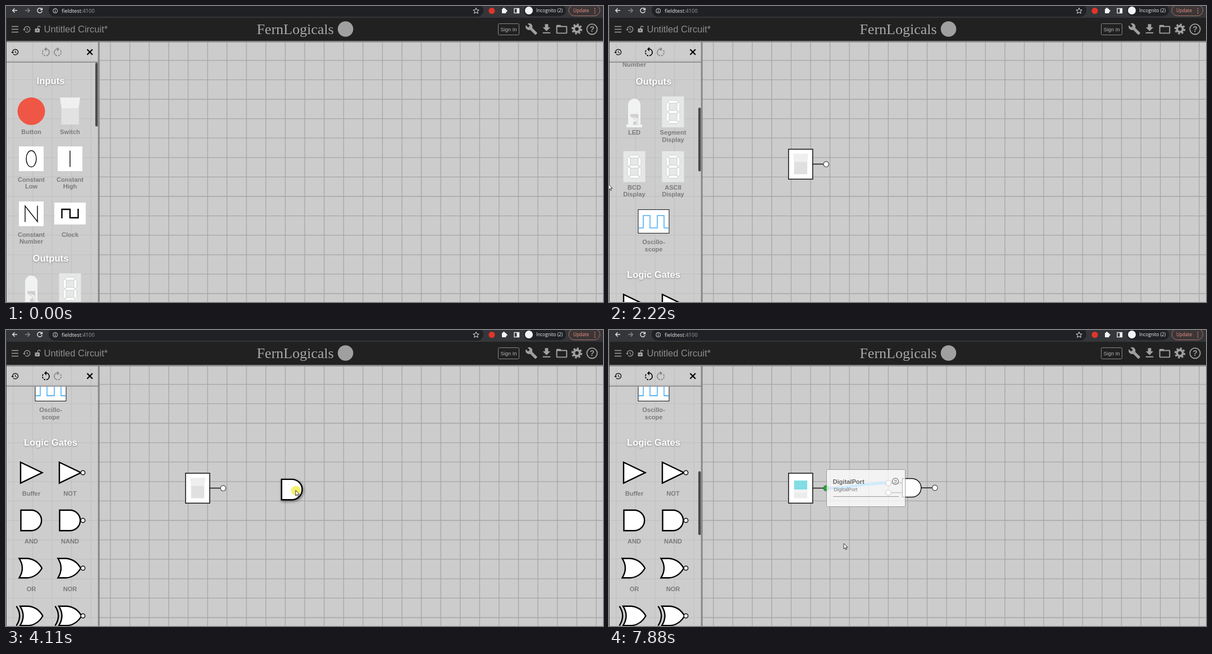
An HTML page that plays this animation: 1063x527 px, repeating every 8000 ms.

```html
<!DOCTYPE html>
<html lang="en">
<head>
<meta charset="utf-8">
<title>Circuit editor</title>
<style>
  html, body { margin: 0; width: 100%; height: 100%; overflow: hidden; background: #ccc; }
  svg { display: block; font-family: "Liberation Sans", Arial, sans-serif; }
  .ui { font-family: "Open Sans", sans-serif; font-size: 9.3px; }
  .label { font-weight: bold; font-size: 11.1px; fill: #7b7b7b; text-anchor: middle; }
  .head { font-weight: bold; font-size: 16.65px; fill: #fff; text-anchor: middle; filter: drop-shadow(0 1px 1.5px #0005); }
  .thick { fill: #fff; stroke: #000; stroke-width: 2.4; }
  .thin { fill: #fff; stroke: #111; stroke-width: 1.5; }
  .line { fill: none; stroke: #000; stroke-width: 1.4; }
  .ghost { filter: drop-shadow(1px 2px 2.5px #0007); }
</style>
</head>
<body>
<svg id="stage" width="1063" height="527" viewBox="0 0 1063 527"></svg>
<script>
const stage = document.getElementById('stage');
const el = id => document.getElementById(id);

// Markup helpers
const text = (x, y, s, attrs) => `<text x="${x}" y="${y}" ${attrs}>${s}</text>`;
const label = (x, y, ...lines) => lines.map((s, i) => text(x, y + i * 12.7, s, 'class="label"')).join('');
const heading = (y, s) => text(79.5, y, s, 'class="head"');
const rect = (x, y, w, h, attrs = '') => `<rect x="${x}" y="${y}" width="${w}" height="${h}" ${attrs}/>`;
const circle = (x, y, r, attrs = '') => `<circle cx="${x}" cy="${y}" r="${r}" ${attrs}/>`;
const path = (d, attrs = '') => `<path d="${d}" ${attrs}/>`;
const at = (x, y, body, scale = 1, flip = 1) =>
  `<g transform="translate(${x} ${y}) scale(${scale * flip} ${scale})">${body}</g>`;

// Icons, each around 0,0 from a 24 unit box
const icon = d => path(d, 'transform="translate(-12 -12)"');
const history = icon('M13 3a9 9 0 0 0-9 9H1l4 4 4-4H6a7 7 0 1 1 2 5l-1.400 1.400A9 9 0 1 0 13 3zm-1 5v5l4.300 2.500.700-1.200-3.500-2.100V8z');
const rotate = icon('M7.110 8.530 5.700 7.110A8 8 0 0 0 4.070 11h2.020c.140-.870.490-1.720 1.020-2.470zM6.090 13H4.070c.170 1.390.720 2.730 1.620 3.890l1.410-1.420A6 6 0 0 1 6.090 13zm1.010 5.320c1.160.900 2.510 1.440 3.900 1.610V17.900a6 6 0 0 1-2.460-1.030zM13 4.070V1L8.450 5.550 13 10V6.090a6 6 0 0 1 0 11.820v2.020a8 8 0 0 0 0-15.860z');
const wrench = icon('M22.700 19l-9.100-9.100c.9-2.300.4-5-1.500-6.900-2-2-5-2.400-7.400-1.300L9 6 6 9 1.600 4.700C.4 7.100.9 10.100 2.900 12.100c1.900 1.900 4.600 2.400 6.900 1.500l9.100 9.100c.4.4 1 .4 1.400 0l2.300-2.300c.5-.4.5-1.100.1-1.400z');
const download = icon('M19 9h-4V3H9v6H5l7 7 7-7zM5 18v2h14v-2z');
const folder = icon('M2 5.500a1.500 1.500 0 0 1 1.500-1.500H9.500l2 2H20.500a1.500 1.500 0 0 1 1.500 1.500V18.500a1.500 1.500 0 0 1-1.500 1.500H3.500a1.500 1.500 0 0 1-1.500-1.500zM4 8V18H20V8z');
const gear = circle(0, 0, 5.2, 'fill="none" stroke="#a0a0a0" stroke-width="4"') +
  circle(0, 0, 8.2, 'fill="none" stroke="#a0a0a0" stroke-width="3" pathLength="16" stroke-dasharray="1.05 .95"');

// Parts, centred on 0,0
const switchIcon = path('M-15.500-5H16V24H-15.500z', 'fill="#e2e2e2"') + path('M-18-24H18L15.500-5H-15z', 'fill="#f0f0f0"');
const bubble = circle(23, 0, 3.7, 'class="thin"');
const buffer = path('M-19-18.500 19.500 0-19 18.500z', 'class="thick"');
const and = path('M-18.500-18.200H0A18.200 18.200 0 0 1 0 18.200H-18.500z', 'class="thick"');
const or = path('M-21.500-17.300H-7Q10-16 19 0 10 16-7 17.300H-21.500Q-10.500 0-21.500-17.300z', 'class="thick"');
const xor = at(1.5, 0, or) + path('M-26.500-17.300Q-15 0-26.500 17.300', 'class="thick" style="fill:none"');
const segH = y => path(`M-9 ${y}l2.500-2.500h13l2.500 2.500-2.500 2.500h-13z`);
const segV = (x, y) => path(`M${x} ${y}l2.500 2.500v12l-2.500 2.500-2.500-2.500v-12z`);
const display = rect(-19.5, -27.5, 39, 55, 'fill="#e6e8e8"') +
  `<g fill="#fff" stroke="#c4c4c4" stroke-width=".8">${[-18, 0, 18].map(segH).join('')}${
    [-9.5, 9.5].map(x => segV(x, -17.5) + segV(x, .5)).join('')}</g>`;
const led = path('M-11 32V-12a11 11 0 0 1 22 0V23H14V28H-14V23H-11z', 'fill="#f1f2f2" transform="translate(0 -.500)"') +
  path('M-7 4H7V23H-2V18L4 16-7 8z', 'fill="#cfcfcf"') + path('M-4 8 4 15V22H6V12z', 'fill="#f1f2f2"');

const tile = (x, y, w, h, d, width = 1.4) =>
  rect(x - w / 2, y - h / 2, w, h, 'fill="#fff"') + at(x, y, path(d, `class="line" style="stroke-width:${width}"`));
const gatePair = (y, shape, a, b) =>
  at(45, y, shape) + at(114, y, shape + bubble) + label(45, y + 41, a) + label(114, y + 41, b);

const palette =
  heading(138.5, 'Inputs') +
  circle(45, 187.3, 24.5, 'fill="#f05645"') + label(45, 228, 'Button') +
  at(114, 187, switchIcon) + label(114, 228, 'Switch') +
  tile(45, 272, 44, 44, 'M0-14.500A9 14.500 0 0 1 0 14.500 9 14.500 0 0 1 0-14.500') + label(45, 312.7, 'Constant', 'Low') +
  tile(114, 272, 44, 44, 'M0-14.500V14.500') + label(114, 312.7, 'Constant', 'High') +
  tile(45, 370, 44, 44, 'M-11 14.500V-14L11 14V-14.500') + label(45, 410.5, 'Constant', 'Number') +
  tile(114, 369.5, 56, 39, 'M-14.500 8.500V-7.500H0V7.500H14.500V-8.500', 2.4) + label(114, 410.5, 'Clock') +
  heading(454.5, 'Outputs') +
  at(45, 503.5, led) + label(45, 544, 'LED') +
  at(114, 503.5, display) + label(114, 544, 'Segment', 'Display') +
  at(45, 601, display) + label(45, 641.5, 'BCD', 'Display') +
  at(114, 601, display) + label(114, 641.5, 'ASCII', 'Display') +
  rect(52, 677.5, 55, 42, 'class="thin" style="stroke-width:1"') +
  path('M53 710h8v-22h12v22h13v-22h12v22h8.500', 'fill="none" stroke="#2a9df0" stroke-width="1.300"') +
  label(79.5, 739, 'Oscillo-', 'scope') +
  heading(798.5, 'Logic Gates') +
  gatePair(847, buffer, 'Buffer', 'NOT') +
  gatePair(932, and, 'AND', 'NAND') +
  gatePair(1017, or, 'OR', 'NOR') +
  gatePair(1102, xor, 'XOR', 'XNOR');

let grid = '';
for (let x = 12.9; x < 1063; x += 34.6) grid += `M${x} 64V527`;
for (let y = 96.8; y < 527; y += 34.6) grid += `M0 ${y}H1063`;

const port = (x, y, id = '') => circle(x, y, 4.8, `class="thin" style="stroke:#444;stroke-width:1.200" id="${id}"`);

const circuit =
  `<g id="gate">${path('M502 272.500H523M502 289.500H523M556 281H576', 'class="thin"')
  }${path('M522.500 264.500H539.300A16.500 16.500 0 0 1 539.300 297.500H522.500z', 'class="thin"')}</g>
  <g id="switch">${path('M363 281.500H382', 'class="thin"')}${rect(319.7, 255, 43, 53.3, 'class="thin"')}
    <g id="off">${rect(329.5, 277, 23.5, 22.5, 'fill="#e0e0e0"')}${path('M327.500 263H355L353 277.500H329.500z', 'fill="#efefef"')}</g>
    <g id="on">${rect(329.5, 268, 23.5, 16.5, 'fill="#82dde4"')}${rect(329.5, 285, 23.5, 14.5, 'fill="#ececec"')}${
      path('M329.500 284H353L355 290H327.500z', 'fill="#f3f3f3"')}</g></g>
  <path id="wire" fill="none" stroke-width="4.800" stroke-linecap="round"/>
  <g id="gatePorts">${port(497.5, 272.5) + port(497.5, 289.5) + port(580.3, 281)}</g>
  ${port(386.7, 281.7, 'source')}`;

const sidebar =
  rect(0, 64, 164, 463, 'fill="#cecece" fill-opacity=".72"') +
  `<g clip-path="url(#list)"><g id="palette">${palette}</g></g>` +
  rect(159, 101, 4.5, 113.5, 'rx="2" fill="#4b4b4b" id="thumb"') +
  rect(0, 99, 164, 1.6, 'fill="#858585"') + rect(163.7, 64, 3, 463, 'fill="#878787"') +
  at(16, 82, history, .62) +
  `<g id="undo">${at(71, 82.5, rotate, .87)}</g><g fill="#858585">${at(92, 82.5, rotate, .87, -1)}</g>` +
  path('M144.500 77.200l9.500 9.500m0-9.500l-9.500 9.500', 'stroke="#000" stroke-width="2.200"');

const header =
  rect(0, 21, 1063, 41.5, 'fill="#212121"') + rect(0, 62, 1063, 2.6, 'fill="#858585"') +
  path('M10 36.500H22M10 41.500H22M10 46.500H22', 'stroke="#a0a0a0" stroke-width="1.400"') +
  `<g fill="#a0a0a0">${at(37, 41.5, history, .64) + at(935.5, 41, wrench, .94) + at(962.5, 41, download, .96) +
    at(989.5, 41.5, folder, .98) + at(1016.5, 41, gear)}` +
  rect(51.5, 40, 8.5, 7, 'rx="1"') + circle(55.7, 43.5, 1, 'fill="#212121"') +
  path('M56.500 40V38a2.200 2.200 0 0 1 4.400 0', 'fill="none" stroke="#a0a0a0" stroke-width="1.200"') +
  text(67.5, 47, 'Untitled Circuit*', 'font-size="16.500" fill="#8e8e8e"') +
  text(515, 49.5, 'FernLogicals', 'font-size="26" text-anchor="middle" fill="#a8a8a8" font-family="Liberation Serif, serif"') +
  circle(604.5, 41, 13.8) +
  rect(876.5, 31.5, 37, 20, 'rx="2" fill="none" stroke="#888"') +
  text(895, 45, 'Sign In', 'font-size="9.300" text-anchor="middle" fill="#b5b5b5"') +
  circle(1043.5, 41.3, 9.2, 'fill="none" stroke="#a0a0a0" stroke-width="1.800"') +
  text(1043.5, 46.3, '?', 'font-size="14" font-weight="bold" text-anchor="middle"') + '</g>';

const browser =
  rect(0, 0, 1063, 21, 'fill="#35363a"') + rect(76, -4, 774, 23, 'rx="11" fill="#202124"') +
  rect(922, -2, 75, 20, 'rx="10" fill="#202124"') +
  `<g fill="none" stroke="#e4e5e8" stroke-width="1.400">${path('M20 8H12M15.500 4.200 11.700 8l3.800 3.800')
  }${path('M34 8H42M38.500 4.200 42.300 8l-3.800 3.800', 'stroke="#85878b"')
  }${path('M63.500 5.500A4.200 4.200 0 1 0 64.200 9M64.500 3.500V6.800H61')
  }${circle(87.7, 8.5, 4, 'stroke-width="1"')}${path('M87.700 8V11M87.700 5.800V7', 'stroke-width="1"')
  }${path('M837 3.500l1.500 3.400 3.700.3-2.800 2.400.9 3.600-3.300-1.900-3.300 1.900.9-3.600-2.800-2.400 3.700-.3z', 'stroke-width="1"')
  }${rect(905, 4.5, 8.5, 8)}</g><g fill="#f1f3f4">${rect(909.5, 4, 4.5, 9)
  }${rect(883, 5, 7.5, 8, 'rx="1"')}${circle(886.5, 4.8, 1.8)}${circle(890.8, 8.8, 1.8)}${circle(931, 8, 7)}</g>` +
  circle(865, 8.5, 5.5, 'fill="#e2352b"') +
  rect(1002, -2, 55.5, 19.5, 'rx="9.700" fill="#3c3636" stroke="#a9716d"') +
  [4.5, 8.5, 12.5].map(y => circle(1048.5, y, .9, 'fill="#f28b82"')).join('') +
  text(99, 12, 'fieldtest<tspan fill="#9aa0a6">:4100</tspan>', 'class="ui" fill="#eceded"') +
  text(944, 11.3, 'Incognito (2)', 'class="ui" style="font-size:8.200px" fill="#eceded"') +
  text(1010, 11.3, 'Update', 'class="ui" style="font-size:8.200px" fill="#f0948c"');

const popup = `<g id="popup">${rect(387.5, 248.5, 140, 66, 'rx="2" fill="#fff" fill-opacity=".76" stroke="#9b9b9b"')
  }${text(398.5, 274, 'DigitalPort', 'font-size="11.100" font-weight="bold" fill="#666"')
  }${text(400, 286.7, 'DigitalPort', 'font-size="9.200" fill="#777"')
  }${path('M399 296.500H516', 'stroke="#999"')}${circle(510, 269.5, 5.6, 'fill="none" stroke="#777" stroke-width="1.100"')
  }${text(510, 273, '?', 'font-size="9.500" text-anchor="middle" fill="#666"')}</g>`;

stage.innerHTML =
  `<clipPath id="list">${rect(0, 100.5, 164, 427)}</clipPath>` +
  rect(0, 0, 1063, 527, 'fill="#ccc"') + path(grid, 'stroke="#a6a6a6" stroke-width="1.300"') +
  circuit + sidebar + header + browser + rect(0, 21, 1, 506, 'fill="#444"') + popup +
  `<g id="ghostSwitch" class="ghost">${switchIcon}</g><g id="ghostAnd" class="ghost">${and}</g>
  <g id="cursor">${circle(.5, .5, 8.5, 'id="glow" fill="#f2ea26" fill-opacity=".68"')
  }${path('M0 0V9.600L2.300 7.600 3.900 11 5.500 10.300 3.900 7H7z', 'fill="#fff" stroke="#222" stroke-width=".9"')}</g>`;

// Pointer stops: time, x, y
const stops = [
  [110, 906, 540], [280, 289, 278], [490, 289, 278], [800, 115, 187], [950, 115, 187],
  [1160, 190, 209], [1210, 311, 267], [1270, 338, 279], [1300, 338, 279], [1630, -1, 317.5],
  [3150, -1, 317.5], [3380, 45, 339], [3540, 45, 339], [3840, 398, 300], [4050, 398, 300],
  [4060, 509, 284], [4110, 515.5, 285.5], [4190, 538, 281], [4350, 538, 281], [4830, 512, 268],
  [4860, 512, 268], [5000, 498, 271], [5200, 498, 271], [5650, 434, 272], [5700, 428, 272],
  [6330, 387, 281], [6800, 387, 281], [7150, 345, 266], [7790, 345, 266], [7880, 418, 380]];

const clamp = v => Math.max(0, Math.min(1, v));
const ramp = (t, a, b) => clamp((t - a) / (b - a));
const glide = (t, a, b) => 1 - (1 - ramp(t, a, b)) ** 2.3;
const within = (t, a, b) => t >= a && t < b;
const show = (id, on) => el(id).style.display = on ? '' : 'none';
const move = (id, x, y) => el(id).setAttribute('transform', `translate(${x} ${y})`);

function pointer(t) {
  const next = stops.findIndex(s => s[0] > t);
  if (next < 1) return stops.at(next).slice(1);
  const [a, b] = [stops[next - 1], stops[next]], k = ramp(t, a[0], b[0]);
  return [a[1] + (b[1] - a[1]) * k, a[2] + (b[2] - a[2]) * k];
}

function draw(t) {
  const dragSwitch = within(t, 960, 1300), dragAnd = within(t, 3570, 4200);
  const lit = t >= 7250, selected = t >= 6500;

  move('cursor', ...pointer(t));
  show('cursor', t >= 110);
  show('glow', [[900, 1280], [3540, 4190], [5000, 5130], [7180, 7300]].some(span => within(t, ...span)));
  for (const [id, on] of [['ghostSwitch', dragSwitch], ['ghostAnd', dragAnd]]) {
    show(id, on);
    move(id, ...pointer(t - 50));
  }

  const scroll = 425 * glide(t, 1910, 2610) + 168 * glide(t, 2740, 3380);
  move('palette', 0, -scroll);
  move('thumb', 0, scroll * .254);
  show('thumb', !dragSwitch && !dragAnd);
  el('undo').setAttribute('fill', t >= 1300 ? '#000' : '#858585');

  show('switch', t >= 1300);
  show('source', t >= 1300);
  show('gate', t >= 4200);
  show('gatePorts', t >= 4200);
  show('on', lit);
  show('off', !lit);
  el('source').style.fill = selected ? '#27a33c' : '#fff';
  el('source').style.stroke = selected ? '#1d8a30' : '#444';

  const [x, y] = t < 6300 ? pointer(t - 30) : [386.7, 281.7], mid = (x + 497.5) / 2;
  show('wire', t >= 5150);
  el('wire').setAttribute('d', `M497.500 272.500C${mid} 272.500 ${mid} ${y} ${x} ${y}`);
  el('wire').setAttribute('stroke', lit ? '#3cacf2' : '#fff');
  el('popup').style.opacity = selected ? ramp(t, 6450, 6610) : 0;
}

function frame() {
  draw(performance.now() % 8000);
  requestAnimationFrame(frame);
}
frame();
</script>
</body>
</html>
```
